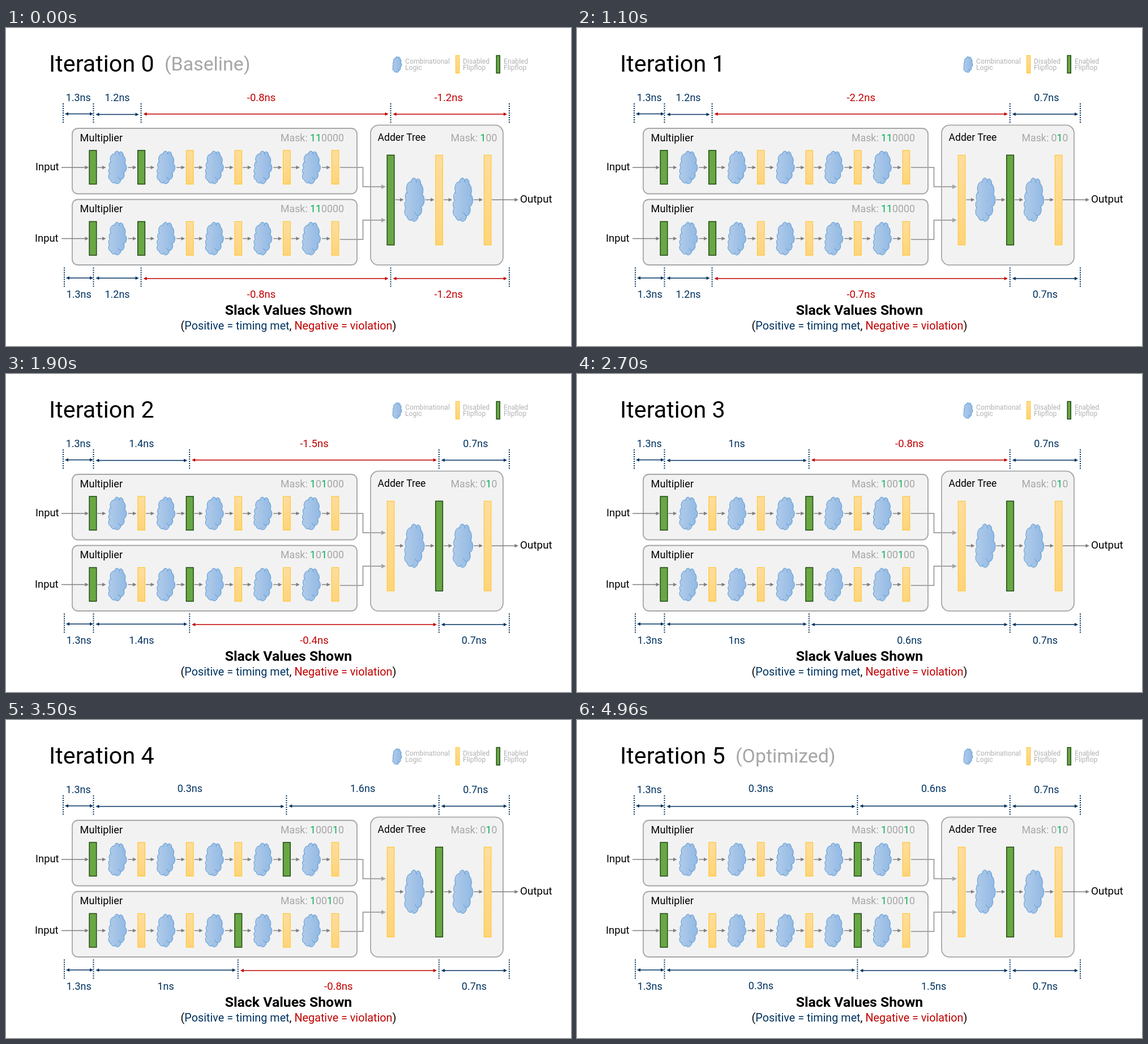
Recreate the animation shown at these times as an HTML page. Size 998 by 561 pixels, loop 5400 ms.

```html
<!DOCTYPE html>
<html lang="en">
<head>
<meta charset="utf-8">
<title>Slack iterations</title>
<style>
  html, body { margin: 0; width: 100%; height: 100%; overflow: hidden; background: #fff; }
  svg { display: block; width: 998px; height: 561px; font: 18px Roboto, sans-serif; }
  .cloud path { vector-effect: non-scaling-stroke; stroke: #5b9bd5; stroke-width: 1; fill: none; }
  .cloud .body { fill: url(#blue); }
</style>
</head>
<body>
<svg viewBox="0 0 998 561">
  <defs>
    <linearGradient id="blue" x2="0" y2="1">
      <stop stop-color="#b1cbe9"/><stop offset="1" stop-color="#92b9e4"/>
    </linearGradient>
    <linearGradient id="yellow" x2="0" y2="1">
      <stop stop-color="#ffdd9c"/><stop offset="1" stop-color="#ffd479"/>
    </linearGradient>
  </defs>
  <g id="fixed"></g>
  <g id="changing"></g>
</svg>
<script>
const NAVY = '#00325f', RED = '#c00000', GRAY = '#a6a6a6', WIRE = '#7f7f7f', GREEN = '#00b050';
const PITCH = 85.6;
const FIRST_SLACK = ['', '1.2', '1.4', '1', '0.3'];  // by position of the second multiplier register

// Each row: [enabled multiplier stage, slack into the adder tree]
const STATES = [
  { ms: 1100, note: '(Baseline)', adder: 0, rows: [[1, '-0.8'], [1, '-0.8']] },
  { ms: 800, adder: 1, rows: [[1, '-2.2'], [1, '-0.7']] },
  { ms: 800, adder: 1, rows: [[2, '-1.5'], [2, '-0.4']] },
  { ms: 800, adder: 1, rows: [[3, '-0.8'], [3, '0.6']] },
  { ms: 800, adder: 1, rows: [[4, '1.6'], [3, '-0.8']] },
  { ms: 1100, note: '(Optimized)', adder: 1, rows: [[4, '0.6'], [4, '1.5']] },
];
const LOOP = STATES.reduce((sum, s) => sum + s.ms, 0);

const text = (x, y, content, { size = 18, fill = '#000', anchor = 'start', weight = 400 } = {}) =>
  `<text x="${x}" y="${y}" font-size="${size}" fill="${fill}" text-anchor="${anchor}" font-weight="${weight}">${content}</text>`;

const line = (d, color, width) => `<path d="${d}" fill="none" stroke="${color}" stroke-width="${width}"/>`;

// Horizontal arrowhead; dir is 1 for right, -1 for left
const head = (x, y, dir, color, size = 6) =>
  `<path d="M${x} ${y}l${-dir * size} ${-size / 2}v${size}z" fill="${color}"/>`;

const arrow = (x1, x2, y) => line(`M${x1} ${y}H${x2 - 5}`, WIRE, 1.4) + head(x2, y, 1, WIRE, 6.5);

const panel = (x, y, w, h, r) =>
  `<rect x="${x}" y="${y}" width="${w}" height="${h}" rx="${r}" fill="#f2f2f2" stroke="${GRAY}" stroke-width="1.8"/>`;

const flipflop = (cx, cy, h, on, w = 12.6) =>
  `<rect x="${cx - w / 2}" y="${cy - h / 2}" width="${w}" height="${h}" ` +
  (on ? 'fill="#68a744" stroke="#1f4a12" stroke-width="1.5"/>' : 'fill="url(#yellow)" stroke="#ffc62e" stroke-width="1.1"/>');

const CLOUD = 'M1930 7160A3376 4595 0 0 1 6970 2600A2667 3633 0 0 1 11210 1700A2182 2972 0 0 1 14870 1160' +
  'A2428 3297 0 0 1 19110 2710A2667 3636 0 0 1 20830 7660A3387 4610 0 0 1 18650 15010A2892 3933 0 0 1 14240 18310' +
  'A3376 4607 0 0 1 8210 19510A3860 5271 0 0 1 2900 17640A2180 2959 0 0 1 1070 12640A2172 2972 0 0 1 1930 7160z';
const CREASES = 'M1070 12640L2346 13088M2900 17640L3464 17449M8210 19510L7860 18640M14240 18310L14413 17375' +
  'M18650 15010A2892 3933 0 0 0 17064 11477M20830 7660L19990 9000M19110 2710L19162 3300M14870 1160L14539 1976' +
  'M11210 1700L11070 2360M6970 2600L7720 3250M1930 7160L2063 7895';

// The path is a lying cloud; it is stood upright and mirrored
const cloud = (cx, cy, w, h) =>
  `<g class="cloud" transform="translate(${cx} ${cy}) rotate(-90) scale(${-h / 21600} ${w / 21600}) translate(-10800 -10800)">` +
  `<path class="body" d="${CLOUD}"/><path d="${CREASES}"/></g>`;

const mask = (x, y, length, enabled) => {
  const bits = Array.from({ length }, (_, i) => enabled.includes(i) ? `<tspan fill="${GREEN}">1</tspan>` : '0');
  return text(x, y, 'Mask: ' + bits.join(''), { size: 17.8, fill: GRAY });
};

function drawFixed() {
  const legend = { size: 12.2, fill: '#b2b2b2' };
  let out = cloud(691, 64.5, 16, 28) + flipflop(797.7, 64, 31, false, 6.5) + flipflop(869.3, 64, 31, true, 6);
  [[705, 'Combinational', 'Logic'], [807, 'Disabled', 'Flipflop'], [879, 'Enabled', 'Flipflop']].forEach(([x, a, b]) => {
    out += text(x, 63, a, legend) + text(x, 74.3, b, legend);
  });

  [[177, 246], [302.5, 371.5]].forEach(([top, y], row) => {
    out += panel(117, top, 503, 115.5, 10) + text(130.5, top + 22.9, 'Multiplier', { size: 18.2 });
    out += text(52 - row, y + 5.3, 'Input', { size: 18.4 }) + arrow(98, 146, y);
    for (let i = 0; i < 5; i++) {
      const x = 153.5 + PITCH * i;
      out += arrow(x + 8, x + 23, y) + cloud(x + 43.5, y, 32, 58) + arrow(x + 62, x + 77, y);
    }
  });

  out += panel(644, 171.4, 234, 246.8, 14) + text(656.5, 199, 'Adder Tree', { size: 17.6 });
  [[246, 280], [373, 339]].forEach(([y, joinY]) => {
    out += line(`M590 ${y}H630.5V${joinY}H665`, GRAY, 2) + head(671, joinY, 1, GRAY, 8);
  });
  for (let i = 0; i < 2; i++) {
    const x = 679.5 + PITCH * i;
    out += arrow(x + 8, x + 23, 303) + cloud(x + 42, 303, 35, 77) + arrow(x + 61, x + 77, 303);
  }
  out += arrow(858, 905, 303) + text(908, 308, 'Output', { size: 18.9 });

  out += text(499, 506, 'Slack Values Shown', { size: 24.8, weight: 700, anchor: 'middle' });
  out += text(499, 532.3, `(<tspan fill="${NAVY}">Positive = timing met</tspan>, ` +
    `<tspan fill="${RED}">Negative = violation</tspan>)`, { size: 19.8, anchor: 'middle' });
  return out;
}

// Dotted stops with a measured arrow and a slack label between each pair
function dimensions(row, stage, adder, slack) {
  const arrowYs = [[151.5, 152.5, 151.7, 152], [441, 441.2, 442, 442]][row];
  const top = [133, 422.5][row], labelY = [129.4, 476][row];
  const stops = [[101, 103][row], 154.5, 153 + PITCH * stage, 679.5 + 85.3 * adder, 889];
  const values = ['1.3', FIRST_SLACK[stage], slack, adder ? '0.7' : '-1.2'];
  let out = stops.map(x =>
    `<path d="M${x} ${top}v36" stroke="${NAVY}" stroke-width="2" stroke-dasharray="2 2"/>`).join('');
  values.forEach((value, i) => {
    const color = value < 0 ? RED : NAVY;
    const from = stops[i] + (i ? 4 : 3), to = stops[i + 1] - (i ? 4 : 0.5);
    const y = arrowYs[i];
    out += line(`M${from + 5} ${y}H${to - 5}`, color, 1.6) + head(from, y, -1, color) + head(to, y, 1, color);
    let x = (stops[i] + stops[i + 1]) / 2;
    if (i === 2 && !adder) x -= 8;
    if (i === 3) x += adder ? 2.5 - 2.5 * row : -2.5;
    const raised = stage === 4 && (row ? i === 1 : i === 1 || i === 2);
    out += text(x, labelY - (raised ? 2 - row : 0), value + 'ns', { size: value < 0 ? 18.5 : 18, fill: color, anchor: 'middle' });
  });
  return out;
}

function drawState(index) {
  const { note, adder, rows } = STATES[index];
  let out = text(76, 77, 'Iteration ' + index, { size: 41.3 });
  if (note) out += text(280, 74.5, note, { size: 33.9, fill: GRAY });
  rows.forEach(([stage, slack], row) => {
    out += dimensions(row, stage, adder, slack) + mask(485, 199.7 + 125.5 * row, 6, [0, stage]);
    for (let i = 0; i < 6; i++) {
      out += flipflop(153.5 + PITCH * i, 245.7 + 125.5 * row, 59.5, i === 0 || i === stage);
    }
  });
  out += mask(785.5, 199.5, 3, [adder]);
  for (let i = 0; i < 3; i++) out += flipflop(679.5 + PITCH * i, 303.5, 158.5, i === adder);
  return out;
}

const changing = document.getElementById('changing');
document.getElementById('fixed').innerHTML = drawFixed();
let shown = -1;

function tick() {
  let time = performance.now() % LOOP, index = 0;
  while (time >= STATES[index].ms) time -= STATES[index++].ms;
  if (index !== shown) changing.innerHTML = drawState(shown = index);
  requestAnimationFrame(tick);
}
tick();
</script>
</body>
</html>
```
